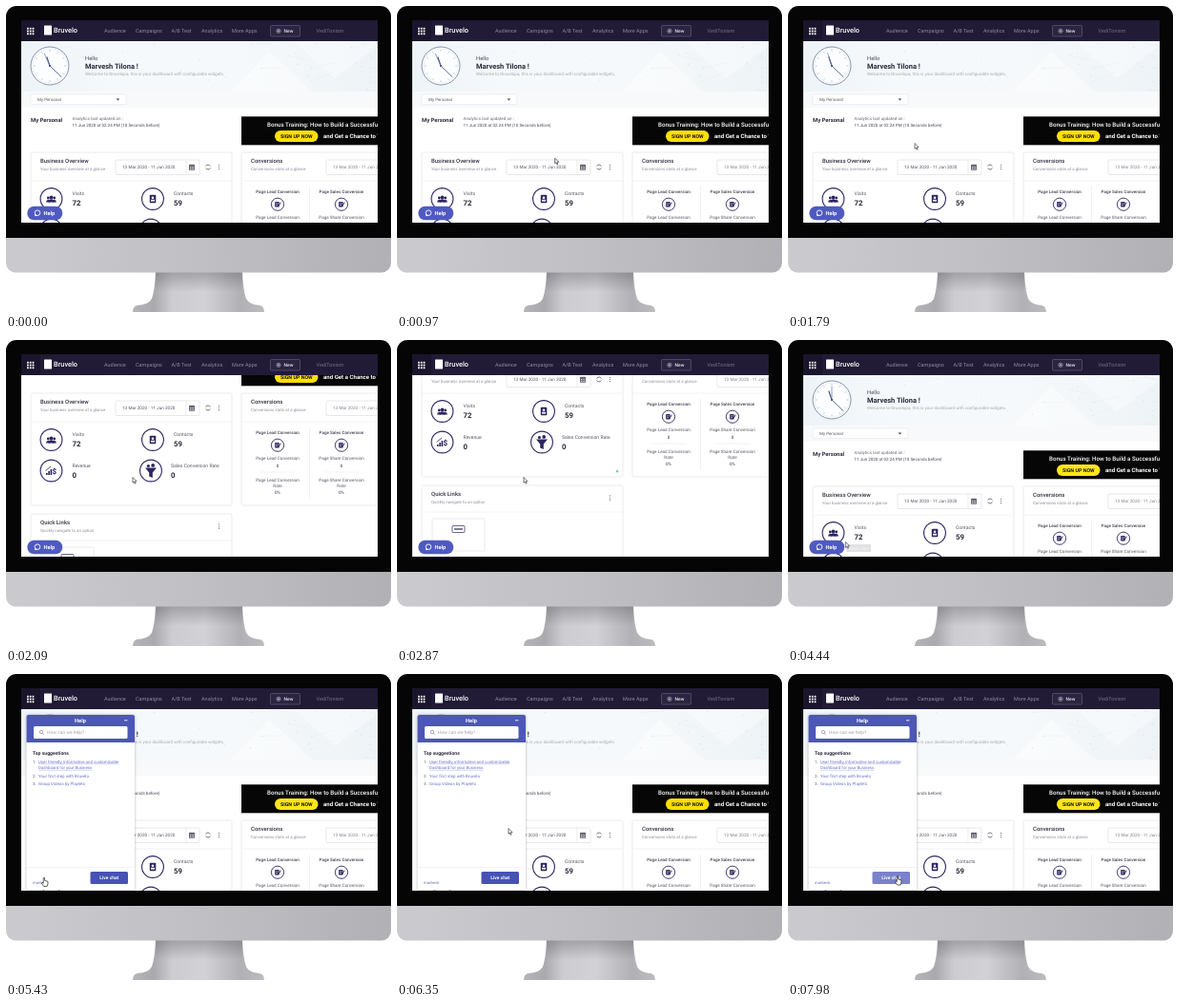
Animation of 404 by 322 pixels, one loop 8 s. Source, as an HTML page with a canvas:

```html
<!DOCTYPE html>
<html lang="en">
<head>
<meta charset="utf-8">
<title>Dashboard on a monitor</title>
<style>
html, body { margin: 0; width: 100%; height: 100%; overflow: hidden; background: #fff; }
canvas { display: block; width: 404px; height: 322px; }
</style>
</head>
<body>
<canvas id="stage"></canvas>
<script>
const W = 404, H = 322, LOOP = 8000;
const canvas = document.getElementById('stage');
const dpr = window.devicePixelRatio || 1;
canvas.width = W * dpr;
canvas.height = H * dpr;
const c = canvas.getContext('2d');

const INK = '#29293a', NAVY = '#2b2560', INDIGO = '#4c57b7', LINK = '#656fca';
const PERSON = 'Marvesh Tilona', BRAND = 'Bruvelo', ACCOUNT = 'VediTonism';

// Tracks: [time, values...]
const cursorPath = [
  [240, 366, 184], [310, 318, 179], [380, 266, 175], [450, 223, 174], [620, 222, 174],
  [800, 190, 170], [1110, 146, 152], [1340, 140, 148], [1640, 133, 144.5], [3520, 133, 144.5],
  [3920, 130, 146], [4150, 98, 174], [4440, 60.5, 212.5], [4580, 39, 215], [6040, 39, 214],
  [6200, 84, 184], [6350, 117, 162.5], [7390, 117, 162.5], [7600, 104, 184],
  [7800, 110, 204], [7980, 114, 213]
];
const scrollSteps = [
  [0, 0], [1920, 18], [1990, 56], [2090, 98], [2160, 114], [2230, 125], [2330, 133],
  [2430, 138], [2500, 140], [2870, 128], [2940, 100], [3010, 78], [3080, 70],
  [3310, 57], [3380, 26], [3450, 6], [3520, 0]
];

function lerpTrack(track, t) {
  let i = 0;
  while (i < track.length - 1 && track[i + 1][0] <= t) i++;
  const a = track[i], b = track[Math.min(i + 1, track.length - 1)];
  const k = b === a ? 0 : Math.max(0, (t - a[0]) / (b[0] - a[0]));
  return [a[1] + (b[1] - a[1]) * k, a[2] + (b[2] - a[2]) * k];
}

function stepTrack(track, t) {
  let v = 0;
  for (const [at, value] of track) if (t >= at) v = value;
  return v;
}

function box(x, y, w, h, fill) {
  c.fillStyle = fill;
  c.fillRect(x, y, w, h);
}

function round(x, y, w, h, r, fill, stroke) {
  c.beginPath();
  c.roundRect(x, y, w, h, r);
  paint(fill, stroke);
}

function paint(fill, stroke, width = 0.7) {
  if (fill) { c.fillStyle = fill; c.fill(); }
  if (stroke) { c.strokeStyle = stroke; c.lineWidth = width; c.stroke(); }
}

function disc(x, y, r, fill, stroke, width) {
  c.beginPath();
  c.arc(x, y, r, 0, Math.PI * 2);
  paint(fill, stroke, width);
}

function line(x1, y1, x2, y2, color, width = 0.7) {
  c.beginPath();
  c.moveTo(x1, y1);
  c.lineTo(x2, y2);
  paint(null, color, width);
}

function poly(points, fill, stroke, width) {
  c.beginPath();
  points.forEach(([x, y]) => c.lineTo(x, y));
  c.closePath();
  paint(fill, stroke, width);
}

// Small type is laid out large and scaled down, so advances are not rounded to pixels.
function text(s, x, y, size, color = INK, weight = 400, align = 'left') {
  const zoom = 10;
  c.save();
  c.translate(x, y + 0.3);
  c.scale(1 / zoom, 1 / zoom);
  c.textRendering = 'geometricPrecision';
  c.font = `${weight} ${size * zoom}px Roboto, "Liberation Sans", sans-serif`;
  c.textAlign = align;
  c.textBaseline = 'middle';
  c.fillStyle = color;
  c.fillText(s, 0, 0);
  const width = c.measureText(s).width / zoom;
  c.restore();
  return width;
}

function gradient(x1, y1, x2, y2, colors) {
  const g = c.createLinearGradient(x1, y1, x2, y2);
  colors.forEach(([at, color]) => g.addColorStop(at, color));
  return g;
}

function drawMonitor() {
  box(0, 0, W, H, '#fff');
  c.beginPath();
  c.moveTo(157, 279);
  c.lineTo(248, 279);
  c.quadraticCurveTo(249, 300, 252, 308);
  c.quadraticCurveTo(255, 314, 266, 315);
  c.quadraticCurveTo(271, 316, 271, 322);
  c.lineTo(133, 322);
  c.quadraticCurveTo(133, 316, 138, 315);
  c.quadraticCurveTo(150, 314, 153, 308);
  c.quadraticCurveTo(156, 300, 157, 279);
  paint(gradient(133, 0, 271, 0, [[0, '#b4b4b9'], [0.16, '#a9a9ae'], [0.3, '#cdcdd1'],
    [0.55, '#d2d2d6'], [0.82, '#b0b0b5'], [1, '#bcbcc0']]));
  box(157, 279, 91, 22, gradient(0, 279, 0, 301, [[0, 'rgba(70,70,75,.35)'], [1, 'rgba(70,70,75,0)']]));
  round(0, 0, W, 250, [11, 11, 0, 0], '#050505');
  round(0, 244, W, 36.5, [0, 0, 10, 10],
    gradient(0, 0, W, 0, [[0, '#cbcbcf'], [0.5, '#c0c0c4'], [1, '#b0b0b5']]));
}

function drawHeader() {
  box(16, 15, 374, 22, '#211b36');
  box(16, 15, 20, 22, '#1a152c');
  for (let i = 0; i < 9; i++) box(22 + (i % 3) * 2.8, 22.8 + Math.floor(i / 3) * 2.8, 1.8, 1.8, '#fff');
  round(40, 20.5, 8, 10, 0.5, '#fff');
  text(BRAND, 50, 25.5, 7.4, '#fff', 500);
  [['Audience', 103], ['Campaigns', 136], ['A/B Test', 173.5], ['Analytics', 205], ['More Apps', 237]]
    .forEach(([s, x]) => text(s, x, 26.5, 5.5, '#908da2'));
  round(277.5, 20.5, 31, 11.5, 1, '#2b2541', '#605b75');
  disc(286, 26.3, 2.1, null, '#c9c7d3', 0.6);
  line(284.9, 26.3, 287.1, 26.3, '#fff', 0.6);
  line(286, 25.2, 286, 27.4, '#fff', 0.6);
  text('New', 291.5, 26.3, 5, '#e3e1ea', 500);
  text(ACCOUNT, 325.5, 26.5, 5.5, '#77728b');
}

function drawClock(t) {
  const x = 46, y = 63;
  disc(x, y, 20, '#f8fafc', '#8b97b0', 1);
  disc(x, y, 18, '#fcfdfe', '#e1e6ed', 0.5);
  for (let i = 0; i < 12; i++) {
    const a = i * Math.PI / 6, sx = Math.sin(a), sy = Math.cos(a);
    line(x + sx * 15.3, y + sy * 15.3, x + sx * 17, y + sy * 17, '#9aa5ba', 0.6);
  }
  const hand = (turn, r, color, width) => {
    const a = turn * Math.PI * 2;
    line(x, y, x + Math.sin(a) * r, y - Math.cos(a) * r, color, width);
  };
  hand(11.37 / 12, 10, '#3d4c78', 1.1);
  hand(22.3 / 60, 17, '#4a5a88', 0.9);
  hand((56 + Math.floor((t + 0.01) / 1050)) / 60, 14.5, '#5e78b4', 0.7);
  disc(x, y, 1.1, '#3d4c78');
}

function drawHero(t) {
  box(16, 35, 374, 55, gradient(16, 0, 390, 0, [[0, '#edf3f7'], [0.25, '#f6f9fb'],
    [0.6, '#f6f9fb'], [1, '#edf3f6']]));
  poly([[236, 90], [276, 48], [322, 90]], 'rgba(255,255,255,.35)');
  poly([[300, 35], [345, 76], [390, 42], [390, 35]], 'rgba(255,255,255,.35)');
  let seed = 11;
  const rnd = () => (seed = seed * 16807 % 2147483647) / 2147483647;
  for (let i = 0; i < 30; i++) {
    const x = 90 + 300 * Math.sqrt(rnd()), y = 38 + rnd() * 50;
    disc(x, y, 0.6, '#d5e0e8');
    if (x > 230 && i % 2) line(x, y, x + 18 + rnd() * 16, y + (rnd() - 0.5) * 24, '#e6edf2', 0.5);
  }
  drawClock(t);
  text('Hello', 83, 54.5, 5.8, '#4b4b5a');
  text(PERSON + ' !', 83, 63, 7.5, '#2a2a3c', 700);
  text('Welcome to Bruvelopa, this is your dashboard with configurable widgets.', 83, 71.3, 4.55, '#a5a9b0');
}

function dots(x, y) {
  for (let i = -1; i < 2; i++) disc(x, y + i * 2.2, 0.6, '#666674');
}

function dateBox(x, color) {
  round(x, 162, 88, 15.5, 1, '#fff', '#dedee4');
  text('13 Mar 2020 - 11 Jun 2020', x + 7, 169.6, 4.65, color);
  line(x + 74, 162, x + 74, 177.5, '#e4e4e9');
  round(x + 77, 166.8, 6, 6, 0.5, '#666674');
  for (let i = 0; i < 6; i++) box(x + 78 + (i % 3) * 1.6, 169.2 + Math.floor(i / 3) * 1.7, 0.9, 0.9, '#fff');
}

function card(x, y, w, h, title, note) {
  round(x, y, w, h, 1.5, '#fff', '#e3e3e8');
  text(title, x + 10, y + 9.3, 6, '#333344', 500);
  text(note, x + 10, y + 17.5, 4.4, '#8c8c98');
}

function peopleIcon(x, y) {
  [[-3.2, -1, 1.4], [3.2, -1, 1.4], [0, -1.7, 1.9]].forEach(([dx, dy, r]) => {
    disc(x + dx, y + dy, r, NAVY);
    c.beginPath();
    c.ellipse(x + dx, y + 3.4, r * 1.55, r * 1.7, 0, Math.PI, 0);
    paint(NAVY);
  });
}

function contactIcon(x, y) {
  round(x - 3.2, y - 4.3, 6.5, 8.6, 0.8, NAVY);
  disc(x, y - 1.2, 1.3, '#fff');
  box(x - 2, y + 0.8, 4, 1.8, '#fff');
}

function revenueIcon(x, y) {
  for (let i = 0; i < 3; i++) box(x - 5.5 + i * 2.3, y + 2.5 - i * 2, 1.6, 2 + i * 2, NAVY);
  line(x - 6, y, x - 0.5, y - 4.5, NAVY, 0.8);
  text('$', x + 3.3, y + 0.6, 8, NAVY, 700, 'center');
}

function funnelIcon(x, y) {
  poly([[x - 6, y - 3], [x + 6, y - 3], [x + 1.8, y + 2], [x + 1.8, y + 7.5], [x - 1.8, y + 6], [x - 1.8, y + 2]], NAVY);
  disc(x - 2.6, y - 5, 1.6, NAVY);
  disc(x + 2.2, y - 5.6, 1.9, NAVY);
}

function stat(icon, x, y, label, value, lx) {
  disc(x, y, 11.4, '#fff', NAVY, 1.1);
  icon(x, y);
  text(label, lx, y - 5.7, 5.1, '#555563');
  text(value, lx, y + 4.8, 7.8, '#28283a', 700);
}

function drawOverview(t) {
  card(26, 154, 211, 118, 'Business Overview', 'Your business overview at a glance');
  line(26, 184, 237, 184, '#eeeef2');
  dateBox(115, '#555563');
  c.beginPath();
  c.arc(212, 169.5, 2.5, 0.4, 2.7);
  paint(null, '#555563', 0.8);
  c.beginPath();
  c.arc(212, 169.5, 2.5, 3.5, 5.9);
  paint(null, '#555563', 0.8);
  dots(223.5, 169.5);
  stat(peopleIcon, 47.5, 203, 'Visits', '72', 69.5);
  stat(contactIcon, 154, 203, 'Contacts', '59', 176);
  stat(revenueIcon, 47.5, 235.5, 'Revenue', '0', 69.5);
  stat(funnelIcon, 152, 235.5, 'Sales Conversion Rate', '0', 173);
  if (t >= 2500) text('»', 231, 266, 7, '#3aa69a', 700, 'center');
}

function conversion(x, kind, second) {
  text(`Page ${kind} Conversion`, x, 195, 4.55, '#414151', 500, 'center');
  disc(x, 208.7, 6.6, '#fff', NAVY, 0.9);
  round(x - 2.8, 206, 4.4, 5.4, 0.4, NAVY);
  line(x - 1.8, 207.8, x + 0.6, 207.8, '#fff', 0.6);
  line(x - 1.8, 209.6, x + 0.2, 209.6, '#fff', 0.6);
  line(x + 0.8, 210.8, x + 3.3, 206.7, NAVY, 1);
  const label = `Page ${second} Conversion`;
  text(label, x, 222, 4.6, '#555563', 400, 'center');
  text('0', x, 230.3, 4.6, '#333344', 400, 'center');
  line(x - 18, 237, x + 18, 237, '#eeeef2');
  text(label, x, 245, 4.6, '#555563', 400, 'center');
  text('Rate', x, 251.8, 4.6, '#555563', 400, 'center');
  text('0%', x, 258.3, 4.6, '#333344', 400, 'center');
}

function drawConversions() {
  card(247, 154, 180, 118, 'Conversions', 'Conversions stats at a glance');
  line(247, 184, 390, 184, '#eeeef2');
  dateBox(336, '#80808c');
  line(318.5, 190, 318.5, 264, '#eaeaef');
  conversion(285, 'Lead', 'Lead');
  conversion(352, 'Sales', 'Share');
}

function drawBanner(t) {
  const blink = Math.floor((t + 460) / 529) % 2;
  box(247, 116.3, 143, 30, '#060606');
  text('Bonus Training: How to Build a Successful', 274, 124.5, 6.25, '#fff', 500);
  round(282, 131, 45.5, 12, 6, blink ? '#ffe61a' : '#ffe000');
  text('SIGN UP NOW', 304.8, 137, 5.3, '#111', 700, 'center');
  text('and Get a Chance to Win', 333, 137, 6.1, '#fff', 700);
}

function drawQuickLinks() {
  card(26, 281, 211, 120, 'Quick Links', 'Quickly navigate to an option');
  dots(223.5, 294);
  line(26, 309, 237, 309, '#eeeef2');
  round(37, 316, 55, 34, 1, '#fff', '#e3e3e8');
  round(58, 323.5, 13, 7, 1, null, NAVY);
  line(60, 327, 69, 327, NAVY, 1.2);
}

function drawPage(t) {
  box(16, 35, 374, 500, '#fff');
  drawHero(t);
  box(16, 90, 374, 17, '#f8f9fa');
  round(26, 93, 100, 10.5, 1, '#fff', '#e9eaee');
  text('My Personal', 33, 98.2, 4.5, '#555563');
  poly([[115.5, 97.4], [119.3, 97.4], [117.4, 99.6]], '#444');
  text('My Personal', 26, 120.3, 5.9, '#2c2c3e', 700);
  text('Analytics last updated on :', 69.5, 118.8, 4.55, '#666674');
  text('11 Jun 2020 at 02:24 PM (10 Seconds before)', 69.5, 125, 4.5, '#444453');
  drawBanner(t);
  drawOverview(t);
  drawConversions();
  drawQuickLinks();
}

function drawHelpButton(t) {
  const pressed = t >= 4810;
  round(22.3, 210.7, 37, 14.6, 7.3, pressed ? '#3d479f' : '#4f5ac0');
  disc(33, 217.7, 2.8, null, '#fff', 0.9);
  poly([[30.4, 218.7], [30.2, 221.2], [32.6, 220.4]], '#fff');
  text('Help', 39.5, 218, 5.7, '#fff', 700);
}

function drawPanel(t) {
  const k = Math.min(1, (t - 5050) / 400 + 0.1);
  const ease = 1 - (1 - k) ** 3;
  c.save();
  c.globalAlpha = ease;
  c.translate(0, (1 - ease) * 24);
  c.save();
  c.shadowColor = 'rgba(0,0,0,.3)';
  c.shadowBlur = 3 * dpr;
  round(21.5, 43, 113.5, 184.5, [2, 2, 0, 0], '#fff');
  c.restore();
  round(21.5, 43, 113.5, 29, [2, 2, 0, 0], INDIGO);
  text('Help', 78, 48.8, 5.7, '#fff', 700, 'center');
  line(124, 48.8, 127.5, 48.8, '#fff', 0.9);
  round(29, 55, 98.5, 13, 1.5, '#fff');
  disc(37, 61, 1.7, null, '#8a8a96', 0.7);
  line(38.2, 62.2, 39.8, 63.8, '#8a8a96');
  text('How can we help?', 43, 61.7, 4.9, '#a0a0aa');
  text('Top suggestions', 28, 82.7, 5.1, '#2c2c3e', 700);
  const link = (s, y) => {
    const width = text(s, 34, y, 4.4, LINK);
    line(34, y + 2.7, 34 + width, y + 2.7, '#9299da', 0.4);
  };
  ['1.', '2.', '3.'].forEach((s, i) => text(s, 28, [92, 107, 115.6][i], 4.5, '#666674'));
  link('User friendly, informative and customizable', 92);
  link('Dashboard for your Business', 98.6);
  text(`Your first step with ${BRAND}`, 34, 107, 4.45, LINK);
  text('Group Videos by Playlets', 34, 115.6, 4.45, LINK);
  line(21.5, 203.5, 135, 203.5, '#ececf1');
  text('morbeck', 28, 219, 4.2, LINK);
  round(88.5, 208, 39.5, 13, 1.5, t >= 7900 ? '#7982cb' : '#4652b4');
  text('Live chat', 108.3, 214.6, 4.9, '#fff', 700, 'center');
  c.restore();
}

function drawCursor(t) {
  if (t < 240) return;
  const [x, y] = lerpTrack(cursorPath, t);
  const hand = (t >= 4510 && t < 6100) || t >= 7900;
  c.save();
  c.translate(x, y);
  c.lineJoin = 'round';
  if (hand) {
    poly([[0.3, 0], [1.5, 0], [1.7, 3], [4.8, 3.8], [5, 6], [4.2, 9], [0.6, 9],
      [-1.8, 5.6], [-1, 4.8], [0.2, 5.8]], '#fff', '#222', 0.7);
  } else {
    c.scale(0.85, 0.85);
    poly([[0, 0], [0, 6.8], [1.5, 5.4], [2.6, 7.9], [3.7, 7.4], [2.7, 5], [4.8, 4.9]], '#fff', '#333', 0.8);
  }
  c.restore();
}

function draw(t) {
  c.setTransform(dpr, 0, 0, dpr, 0, 0);
  drawMonitor();
  c.save();
  c.beginPath();
  c.rect(16, 15, 374, 213);
  c.clip();
  c.save();
  c.translate(0, -stepTrack(scrollSteps, t));
  drawPage(t);
  c.restore();
  drawHeader();
  if (t < 5190) drawHelpButton(t);
  if (t >= 5050) drawPanel(t);
  if (t >= 4370 && t < 4510) {
    round(61, 215, 26, 8, 0.5, '#e2e2e5');
    text('Open chat', 64, 219, 4.4, '#fafafa');
  }
  drawCursor(t);
  c.restore();
}

const start = performance.now();
function frame() {
  draw((performance.now() - start) % LOOP);
  requestAnimationFrame(frame);
}
frame();
</script>
</body>
</html>
```
